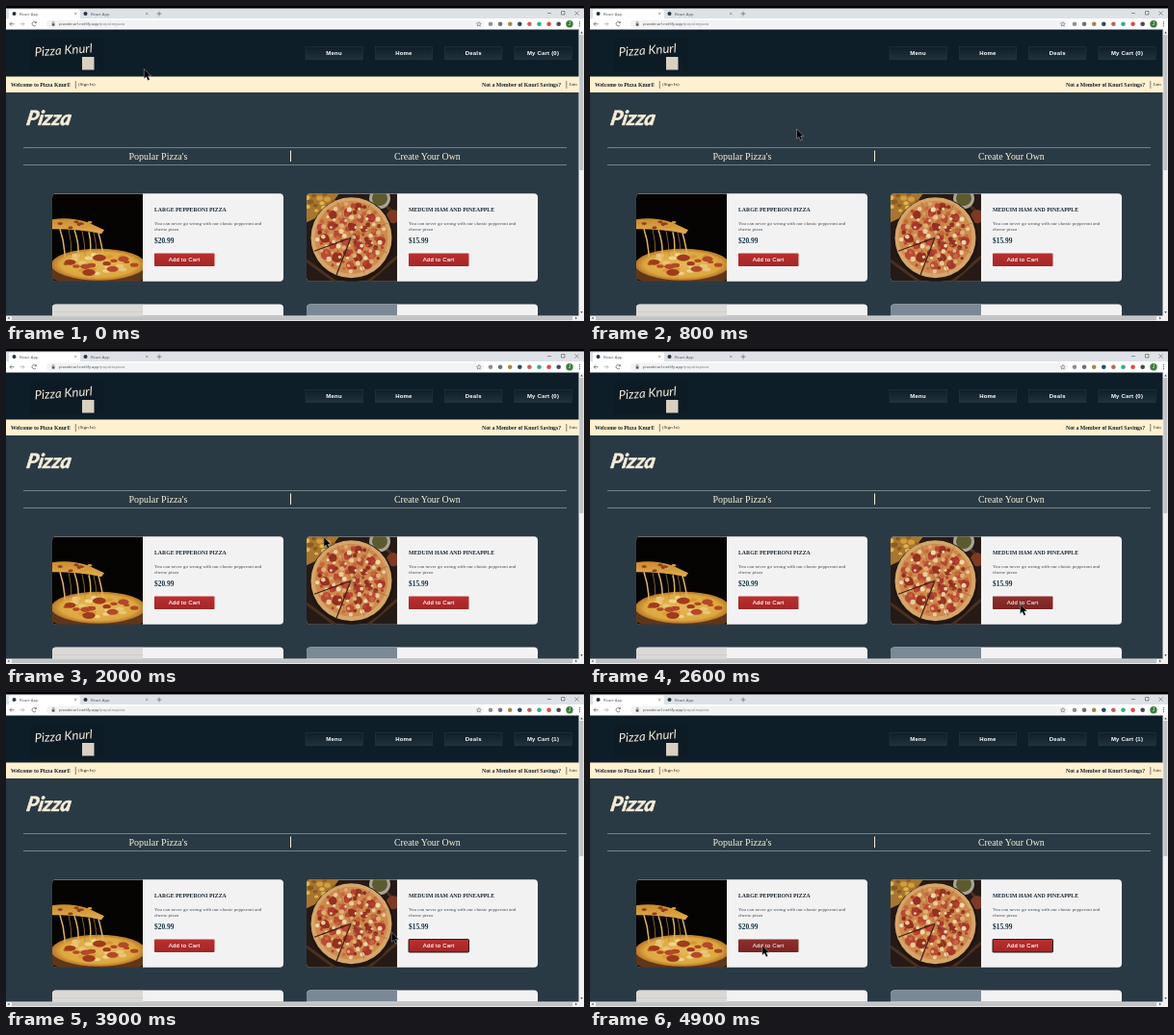
An HTML page for the animation above (5000 ms loop, 600 px wide and 328 px high).

```html
<!DOCTYPE html>
<html lang="en">
<head>
<meta charset="utf-8">
<title>Pizza menu</title>
<style>
  html, body { margin: 0; width: 100%; height: 100%; overflow: hidden; background: #2a3a44; }
  svg { display: block; width: 600px; height: 328px; }
  text { font-family: "Liberation Serif", serif; white-space: pre; }
  .ui { font-family: "Liberation Sans", sans-serif; letter-spacing: .2px; }
  .tab { font-family: "Open Sans", sans-serif; }
  .script { font-family: Lato, sans-serif; font-style: italic; }
  .bold { font-weight: bold; }
  .mid { text-anchor: middle; }
</style>
</head>
<body>
<svg id="stage" viewBox="0 0 600 328">
  <defs>
    <linearGradient id="nav" x2="0" y2="1"><stop stop-color="#0f1e28"/><stop offset="1" stop-color="#20323d"/></linearGradient>
    <linearGradient id="red" x2="0" y2="1"><stop stop-color="#bb302f"/><stop offset="1" stop-color="#a32627"/></linearGradient>
    <linearGradient id="dark" x2="0" y2="1"><stop stop-color="#8f302d"/><stop offset="1" stop-color="#782423"/></linearGradient>
    <linearGradient id="slice" x2="0" y2="1"><stop stop-color="#c98a2f"/><stop offset="1" stop-color="#e2ad4c"/></linearGradient>
    <radialGradient id="cheese"><stop stop-color="#e6b65a"/><stop offset=".8" stop-color="#dca83f"/><stop offset="1" stop-color="#b8742a"/></radialGradient>
    <clipPath id="photo"><path d="M94 0H4Q0 0 0 4V87.500Q0 91.500 4 91.500H94Z"/></clipPath>
    <clipPath id="page"><rect y="24.500" width="595" height="298"/></clipPath>
  </defs>
  <g id="scene"></g>
  <path id="cursor" d="M0 0V10.200L2.300 8.200L4 12L5.900 11.200L4.200 7.500H7.300Z" fill="#000" stroke="#dde1e3" stroke-width=".4"/>
</svg>
<script>
const LOOP = 5000, STEP = 100, CLICK = 3600;
const $ = id => document.getElementById(id);

const rect = (x, y, w, h, fill, more = '') =>
  `<rect x="${x}" y="${y}" width="${w}" height="${h}" fill="${fill}" ${more}/>`;
const oval = (x, y, rx, ry, fill) => `<ellipse cx="${x}" cy="${y}" rx="${rx}" ry="${ry}" fill="${fill}"/>`;
const dot = (x, y, r, fill) => oval(x, y, r, r, fill);
const line = (d, color, width = .7) =>
  `<path d="${d}" fill="none" stroke="${color}" stroke-width="${width}"/>`;
const text = (x, y, size, fill, str, cls = '', more = '') =>
  `<text x="${x}" y="${y}" font-size="${size}" fill="${fill}" class="${cls}" ${more}>${str}</text>`;

let seed = 7;
const random = () => (seed = seed * 16807 % 2147483647) / 2147483647;

// Scatter n toppings inside an ellipse, flattened like the ellipse itself.
function scatter(n, cx, cy, rx, ry, size, colors) {
  let out = '';
  for (let i = 0; i < n; i++) {
    const a = i * 2.4, d = Math.sqrt((i + .5) / n), r = size * (.7 + .6 * random());
    out += oval((cx + rx * d * Math.cos(a)).toFixed(1), (cy + ry * d * Math.sin(a)).toFixed(1),
      r.toFixed(1), (r * Math.max(.5, ry / rx)).toFixed(1), colors[i % colors.length]);
  }
  return out;
}

function browser() {
  const icons = ['#8d9194', '#6b7074', '#a08a4a', '#2b4a5e', '#c0605a', '#25b57c', '#df4a42', '#44494d'];
  const tab = x => dot(x + 5.5, 8, 2, '#24333d') + text(x + 11, 9.500, 4.2, '#53565a', 'React App', 'tab') +
    line(`M${x + 68} 6.700l2.400 2.400m0-2.400l-2.400 2.400`, '#666', .5);
  return rect(0, 0, 600, 25, '#fff') + rect(0, 2.500, 600, 10.500, '#dee1e6') + rect(0, 0, 600, 2.500, '#000') +
    rect(3, 3.500, 74, 10, '#fff', 'rx="2"') + tab(3) + tab(77) +
    line('M156.500 8h5M159 5.500v5M562 7.500h4M590.500 5.500l4 4m0-4l-4 4', '#555', .6) +
    line('M576.500 5.500h3.500v3.500h-3.500z', '#555', .6) +
    rect(42, 14.500, 454, 8.500, '#f1f3f4', 'rx="4.2"') +
    line('M8.500 18.700H4m2-2l-2 2l2 2', '#555') + line('M14.500 18.700H19m-2-2l2 2l-2 2', '#aaa') +
    line('M31 17.300A2.200 2.200 0 1 0 31.200 19.600M31.400 16v1.700h-1.700', '#555') +
    rect(47.700, 18.200, 2.800, 2.400, '#555') + line('M48.200 18.200v-1a.9 .9 0 0 1 1.800 0v1', '#555', .5) +
    text(55, 20.400, 4.2, '#44484b', 'pizzaknurl.netlify.app<tspan fill="#7b7f83">/popularpizza</tspan>', 'tab') +
    line('M490.800 16.500l.7 1.500l1.700 .2l-1.300 1.100l.4 1.700l-1.500-.9l-1.500 .9l.4-1.700l-1.300-1.100l1.700-.2z', '#555', .5) +
    icons.map((color, i) => dot(503 + i * 10.100, 18.700, 2.3, color)).join('') +
    dot(585, 18.700, 3.7, '#397c3b') + text(585, 20.400, 4.8, '#fff', 'J', 'ui mid') +
    [16.700, 18.700, 20.700].map(y => dot(595.500, y, .6, '#555')).join('');
}

function header() {
  const names = ['Menu', 'Home', 'Deals', 'My Cart (0)'];
  return rect(0, 24, 595, 49.500, '#0e1e28') + rect(25, 33, 77, 35, '#0d1b25') +
    text(30, 52.500, 13, '#f3ead9', 'Pizza Knurl', 'script', 'transform="rotate(-4 30 52)"') +
    rect(79, 53, 12.500, 13.500, '#d9d0c2') +
    names.map((name, i) => rect(311 + i * 72.300, 42.300, 59.300, 13.500, 'url(#nav)', 'stroke="#263741" stroke-width=".6"') +
      text(340.600 + i * 72.300, 51, 6, '#fff', name, 'ui bold mid', i === 3 ? 'id="cart"' : '')).join('') +
    rect(0, 73.500, 595, 16.500, '#fff0d0') +
    text(5, 83.500, 5.8, '#14232c', 'Welcome to Pizza Knurl!', 'bold') + text(75, 82.800, 4.9, '#222', '(Sign In)') +
    text(494, 83.500, 5.8, '#14232c', 'Not a Member of Knurl Savings?', 'bold') + text(584.500, 82.800, 4.9, '#222', 'Join') +
    line('M72.300 78v8M581.800 78v8', '#333', .6) +
    text(0, 0, 21, '#f5ecd8', 'Pizza', 'script bold', 'transform="translate(20.500 123.500) skewX(-10)" stroke="#f5ecd8" stroke-width=".7"') +
    line('M18 147.500H582M18 165.500H582', '#7d888e', .9) + line('M295.500 150.500V162', '#f5ecd8', 1) +
    text(158, 160, 10, '#f8eed8', "Popular Pizza's", 'mid') + text(437.300, 160, 9.9, '#f8eed8', 'Create Your Own', 'mid');
}

function slicePhoto() {
  return rect(0, 0, 94, 92, '#060403') +
    oval(48, 80, 56, 17, '#5e371b') + oval(48, 74, 49, 16.5, 'url(#cheese)') +
    scatter(22, 48, 73, 38, 11, 3.6, ['#e9c676', '#b2491f', '#d99836', '#efd489']) +
    scatter(7, 47, 73, 36, 10, 5.4, ['#a03a1c', '#b2482a']) +
    '<path d="M0 27Q18 24 37 30L54 38L51 42Q30 37 0 37Z" fill="url(#slice)"/>' +
    scatter(7, 24, 32, 20, 4, 3, ['#8e3d1c', '#d59a40']) +
    line('M8 37Q13 52 13 66M23 38Q28 52 27 66M38 40Q41 52 39 64M48 41Q51 52 53 64', '#dcb166', 1.5) +
    line('M31 39Q34 51 34 65M43 40Q46 52 46 64M17 37Q20 50 20 65', '#b58842', .7);
}

function roundPhoto() {
  return rect(0, 0, 94, 92, '#251a15') + line('M0 70L30 92M64 92L94 66M70 0L94 24', '#49301f', 3) +
    '<path d="M0 0H34L17 22L0 30Z" fill="#a8762c"/>' + scatter(14, 13, 10, 16, 12, 2.8, ['#e0b350', '#8c5a22', '#d39c3e']) +
    dot(76, 5, 11, '#a9a597') + dot(76, 5, 8, '#5d5a30') + dot(90, 24, 7, '#7c3a24') +
    dot(47, 48, 44, '#20150f') + dot(46.500, 46, 42, '#d5a56a') + dot(46.500, 45.500, 38, '#cf8a4d') +
    scatter(26, 46.500, 45.500, 34, 34, 4.4, ['#a8382a', '#b84a35', '#96301f']) +
    scatter(110, 46.500, 45.500, 36, 36, 2, ['#ebcb98', '#b5472f', '#dfae72', '#8f3122', '#f0d8ab', '#c4683c']) +
    line('M46 46L31 85M46 46L8 60', '#3a2016', 1.2) + line('M46 46L84 31M46 46L60 83M46 46L32 9M46 46L66 11M46 46L84 62', '#a4633a', .6);
}

function card(x, i, title, price, photo) {
  return `<g transform="translate(${x} 195.200)">` + rect(0, 0, 240, 91.500, '#f3f2f3', 'rx="4"') +
    `<g clip-path="url(#photo)">${photo}</g>` +
    text(106, 19, 5.8, '#1b2a33', title, 'bold') +
    text(106, 33.300, 5, '#3f494e', 'You can never go wrong with our classic pepperoni and') +
    text(106, 39.300, 5, '#3f494e', 'cheese pizza') +
    text(106, 51.800, 7.4, '#143444', price, 'bold') +
    rect(106, 62.300, 62.500, 13.500, 'url(#red)', `id="buy${i}" rx=".8" stroke-width=".9"`) +
    text(137, 71, 6, '#fff', 'Add to Cart', 'ui mid', `id="label${i}" stroke="#fff" stroke-width=".12"`) + '</g>';
}

const nextCard = (x, photo) => `<g transform="translate(${x} 310.500)">` +
  rect(0, 0, 240, 30, '#f3f2f3', 'rx="4"') + `<g clip-path="url(#photo)">${photo}</g></g>`;

function scrollbars() {
  return rect(594.5, 24.5, 5.5, 303.5, '#f1f1f1') + rect(595.300, 30, 4, 141, '#c1c2c3') +
    rect(0, 322.5, 600, 5.5, '#f1f1f1') + rect(6, 323.200, 582, 4, '#c1c2c3') +
    '<path d="M597.500 26.500l1.300 2h-2.600zM597.500 320l1.300-2h-2.600zM1.500 325l2-1.300v2.600zM593 325l-2-1.300v2.600z" fill="#555"/>';
}

$('scene').innerHTML = rect(0, 0, 600, 328, '#2a3a44') + browser() + '<g clip-path="url(#page)">' + header() +
  card(48, 0, 'LARGE PEPPERONI PIZZA', '$20.99', slicePhoto()) +
  card(312, 1, 'MEDUIM HAM AND PINEAPPLE', '$15.99', roundPhoto()) +
  nextCard(48, rect(0, 0, 94, 30, '#dbd9d6') + line('M0 8H94', '#c9c7c4', .6)) +
  nextCard(312, rect(0, 0, 94, 30, '#7b8996')) +
  '</g>' + scrollbars();

// Each move: start, end, target x, target y, upward arc.
const moves = [
  [100, 700, 214.5, 128, 0],
  [900, 1300, 213.3, 126, 0],
  [1500, 2500, 446.5, 265.5, 0],
  [2700, 3200, 443.8, 264.5, 0],
  [3600, 4767, 178.8, 263.8, 20]
];

function pointer(time) {
  let x = 143.3, y = 65.5;
  for (const [start, end, toX, toY, arc] of moves) {
    const u = Math.min(1, Math.max(0, (time - start) / (end - start)));
    const ease = u * u * (3 - 2 * u);
    x += (toX - x) * ease;
    y += (toY - y) * ease - arc * Math.sin(Math.PI * u);
  }
  return [x, y];
}

function draw(now) {
  const time = Math.floor(now % LOOP / STEP) * STEP;
  const [x, y] = pointer(time), clicked = time >= CLICK;
  $('cursor').setAttribute('transform', `translate(${x} ${y})`);
  $('cart').textContent = `My Cart (${+clicked})`;
  [154, 418].forEach((left, i) => {
    const over = x >= left && x <= left + 62.5 && y >= 257 && y <= 271;
    $('buy' + i).setAttribute('fill', over ? 'url(#dark)' : 'url(#red)');
    $('label' + i).setAttribute('opacity', over ? .85 : 1);
  });
  $('buy1').setAttribute('stroke', clicked ? '#111' : 'none');
  requestAnimationFrame(draw);
}
requestAnimationFrame(draw);
</script>
</body>
</html>
```
